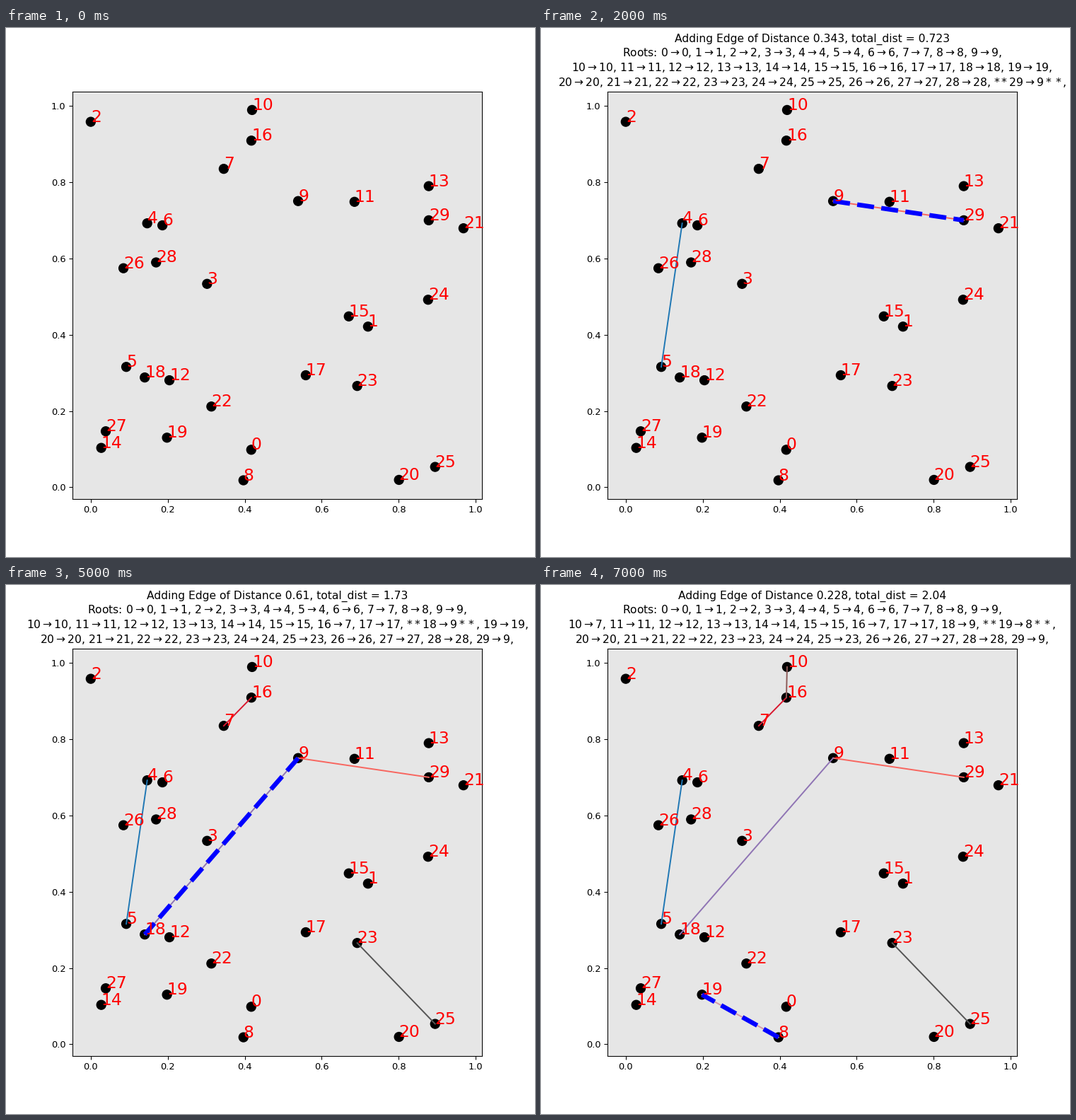
A matplotlib script that plays this animation: 748 by 748 pixels, repeating every 8 s.

```python
import matplotlib.pyplot as plt
import numpy as np
from matplotlib.animation import FuncAnimation

SIDE = 748
DPI = 94
COUNT = 30
EDGES = [(4, 5), (9, 29), (23, 25), (7, 16), (9, 18), (10, 16), (8, 19)]
COLORS = ["#1f77b4", "#f8665f", "#555555", "#d9182f",
          "#8f74b4", "#8c5a58", "#d498a8"]

# A finer horizontal grid keeps the glyph widths close to their nominal size.
plt.rcParams.update({
    "text.hinting_factor": 32,
    "font.size": 9.95,
    "axes.titlesize": 11.9,
    "lines.linewidth": 1.49,
})

np.random.seed(1)
xs, ys = np.random.rand(2, COUNT)


def make_title(dist, total, roots, changed):
    """Heading plus the root of every node, ten nodes per line."""
    items = []
    for node, root in enumerate(roots):
        stars = "**" if node == changed else ""
        items.append(rf"${stars}{node}\to{root}{stars}$,")
    rows = [" ".join(items[i:i + 10]) for i in range(0, COUNT, 10)]
    head = f"Adding Edge of Distance {dist:.3g}, total_dist = {total:.3g}"
    return "\n".join([head, "Roots: " + rows[0], *rows[1:]])


def build_titles():
    roots = list(range(COUNT))
    titles = [""]
    total = 0
    for a, b in EDGES:
        dist = np.hypot(xs[a] - xs[b], ys[a] - ys[b])
        total += dist
        low, high = sorted((roots[a], roots[b]))
        roots = [low if r == high else r for r in roots]
        titles.append(make_title(dist, total, roots, high))
    return titles


fig, ax = plt.subplots(figsize=(SIDE / DPI, SIDE / DPI), dpi=DPI)
ax.set_facecolor("#e6e6e6")
# One size per dot avoids rounding the centres to whole pixels.
ax.scatter(xs, ys, s=np.full(COUNT, 99), c="black")
for node in range(COUNT):
    ax.annotate(str(node), (xs[node], ys[node]), color="red", fontsize=17.9)

lines = []
for (a, b), color in zip(EDGES, COLORS):
    ends = [xs[a], xs[b]], [ys[a], ys[b]]
    thin, = ax.plot(*ends, color=color)
    dashed, = ax.plot(*ends, "--", color="blue", lw=4.97)
    lines.append((thin, dashed))

titles = build_titles()


def update(step):
    ax.set_title(titles[step])
    for i, (thin, dashed) in enumerate(lines, 1):
        thin.set_visible(i <= step)
        dashed.set_visible(i == step)
    return []


anim = FuncAnimation(fig, update, frames=len(titles), interval=1000,
                     repeat=True, repeat_delay=0)
plt.show()
```
